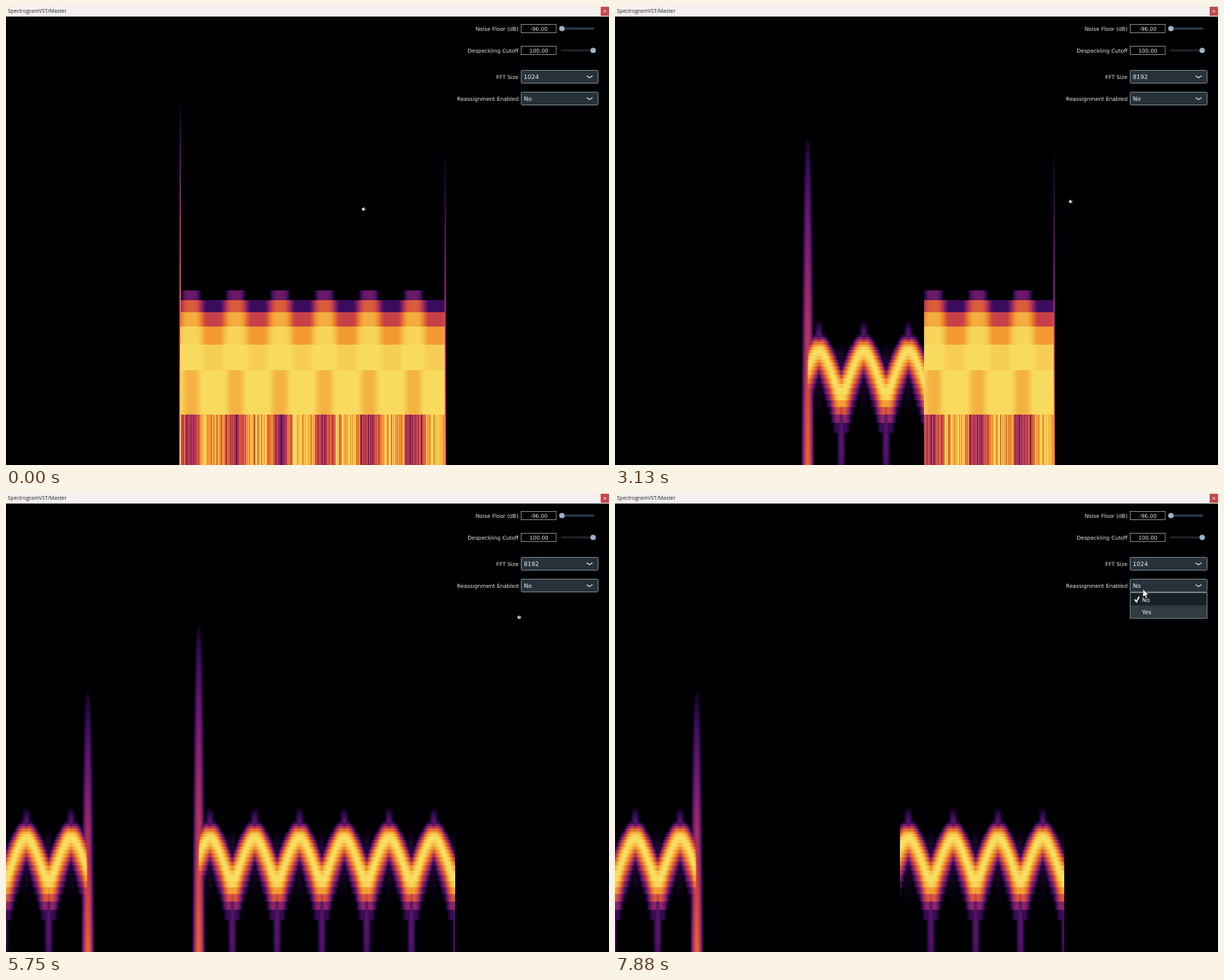
These frames come from a looping animation (800x610 px, 8000 ms). An HTML page with a canvas:

```html
<!DOCTYPE html>
<html lang="en">
<head>
<meta charset="utf-8">
<title>Spectrogram</title>
<style>
  html, body { margin: 0; width: 100%; height: 100%; overflow: hidden; background: #000; }
  canvas, svg { position: absolute; left: 0; top: 0; width: 800px; height: 610px; }
  text { font-family: "DejaVu Sans", sans-serif; font-size: 7.15px; fill: #e4e4e4; }
  .title { font-family: "Open Sans", sans-serif; font-size: 6.9px; fill: #222; }
  .label { text-anchor: end; }
  .number { text-anchor: middle; }
  .choice { font-size: 7.8px; fill: #f0f0f0; }
  .field { fill: #000; stroke: #8d8d8d; stroke-width: .9; }
  .combo { fill: #263238; stroke: #7f9096; stroke-width: .9; }
  .chevron { fill: none; stroke: #e4e8ea; stroke-width: 1.2; }
</style>
</head>
<body>
<canvas id="stage" width="800" height="610"></canvas>
<svg viewBox="0 0 800 610">
  <rect width="800" height="14" fill="#f5f1f0"/>
  <text class="title" x="2.5" y="9">SpectrogramVST/Master</text>
  <rect x="789" y="1" width="11" height="12" fill="#c44a4c"/>
  <path d="M793 5.5l3 3m0-3l-3 3" stroke="#fff" stroke-width=".9"/>
  <g id="controls"></g>
  <g id="menu">
    <rect x="683.5" y="132.5" width="102" height="34" fill="#303c40" stroke="#77868b" stroke-width=".9"/>
    <rect x="684" y="133" width="101" height="16.5" fill="#182126"/>
    <path d="M689.5 141.5l2.3 3.2 3.7-7" fill="none" stroke="#fff" stroke-width="1.6"/>
    <text class="choice" x="699" y="144.5">No</text>
    <text class="choice" x="699" y="161">Yes</text>
  </g>
  <g id="pointer" fill="#fff">
    <path id="arrow" d="M0 0V10L2.4 8 4 11.6 5.6 10.9 4 7.3H7Z" stroke="#222" stroke-width=".4"/>
    <path id="speaker" d="M-2.2-1.2H-1L.4-3V3L-1 1.2H-2.2ZM1-1.5h1v3H1Z"/>
  </g>
</svg>
<script>
const LOOP = 8000, STEP = 125;
const WRAP = 600, VISIBLE = 596, HEIGHT = 610;
const $ = id => document.getElementById(id);
const clamp = (v, a = 0, b = 1) => Math.max(a, Math.min(b, v));
const mix = (a, b, u) => a + (b - a) * u;
const smooth = (a, b, v) => { const u = clamp((v - a) / (b - a)); return u * u * (3 - 2 * u); };

// Evenly spaced colours from silent to loud.
const heat = ["#000003", "#3a0c5c", "#821f6a", "#c94147", "#f08a28", "#f9e464"]
  .map(hex => [1, 3, 5].map(i => parseInt(hex.slice(i, i + 2), 16)));

function colour(level) {
  const u = clamp(level) * (heat.length - 1), i = Math.min(Math.floor(u), heat.length - 2);
  return heat[i].map((v, c) => mix(v, heat[i + 1][c], u - i));
}

let seed = 7;
const random = () => (seed = (seed * 16807) % 2147483647) / 2147483647;

function paint(width, level) {
  const canvas = document.createElement("canvas");
  canvas.width = width;
  canvas.height = HEIGHT;
  const ctx = canvas.getContext("2d"), image = ctx.createImageData(width, HEIGHT);
  for (let y = 0, p = 0; y < HEIGHT; y++) {
    for (let x = 0; x < width; x++, p += 4) image.data.set([...colour(level(x, y)), 255], p);
  }
  ctx.putImageData(image, 0, 0);
  return canvas;
}

// Frequency bin of a row: the axis is logarithmic, bin 1 starts at y = base.
const binAt = (y, base) => Math.floor(Math.exp((base - y) / 84.3)) + .5;

// A click: a vertical spike that widens and brightens downwards.
function click(x, y, centre, top, loudness, width, fade) {
  const u = (y - top) / (HEIGHT - top);
  if (u <= 0) return 0;
  return loudness * u ** fade * (1 - ((x - centre) / (width * u ** .25)) ** 2);
}

// Short window: few broad bins, sharp clicks, unstable lowest bin.
const streaks = Array.from({ length: VISIBLE }, () => .12 - .3 * random() - .35 * random() ** 9);

function coarse(x, y) {
  const clicks = Math.max(
    click(x, y, 230.7, 125, 1.1, 1.6, .6), click(x, y, 582.1, 195, .8, 1.6, .6));
  if (x < 231 || x > 581) return clicks;
  const pitch = mix(1.4, 2.7, smooth(-.7, 1, Math.cos((x - 245) / 59 * 2 * Math.PI)));
  const bin = binAt(y, 542);
  const distance = bin > pitch ? bin - pitch : (pitch - bin) * 1.45;
  const level = .98 * (1 - (distance / 4.5) ** 2.5);
  return Math.max(clicks, bin < 1 ? level + streaks[x] : level);
}

// Long window: narrow bins follow a sine-modulated tone, clicks are blurred.
const START = 255.2, END = 708, PERIOD = 59.4;

function tone(x, y) {
  const bin = binAt(y, 717.3), angle = (x - START) / PERIOD * 2 * Math.PI;
  const s = Math.sin(angle), d = bin - 16.4 - 5.3 * s, inner = d * s < 0;
  const width = (5.2 + .8 * s + 3.6 * Math.abs(Math.cos(angle))) * (inner ? 1 + .35 * Math.abs(s) : 1);
  const ridge = .99 * Math.max(0, 1 - (d / width) ** 2) ** 1.3;
  const offset = Math.acos(Math.min(1, Math.abs(s))) / (2 * Math.PI) * PERIOD;
  const lobe = (inner ? .12 : .28) * (1 - (offset / 6) ** 2) * clamp(2 - Math.abs(d) / 7);
  return Math.max(ridge, lobe) * smooth(START - 5, START + 2, x) * smooth(END + 4, END - 3, x);
}

const fine = (x, y) => Math.max(
  tone(x, y), click(x, y, START, 176, .71, 9, .52), click(x, y, END, 262, .71, 9, .6));

const before = paint(VISIBLE, coarse);
const after = paint(1000, fine);

function addControls() {
  const number = (y, label, value, knob, track) => `
    <text class="label" x="680" y="${y + 2.6}">${label}</text>
    <rect class="field" x="683.5" y="${y - 5.5}" width="46.5" height="11"/>
    <text class="number" x="707" y="${y + 2.7}">${value}</text>
    <rect x="736" y="${y - 1.5}" width="44.5" height="3" rx="1.5" fill="${track}"/>
    <circle cx="${knob}" cy="${y}" r="3.6" fill="#9fb4c8"/>`;
  const combo = (y, label, id, value) => `
    <text class="label" x="680" y="${y + 2.6}">${label}</text>
    <rect class="combo" x="683.5" y="${y - 8.5}" width="102" height="17" rx="1"/>
    <text class="choice" id="${id}" x="687" y="${y + 2.8}">${value}</text>
    <path class="chevron" d="M770.3 ${y - 1.2}l3.9 2.6 3.9-2.6"/>`;
  $("controls").innerHTML =
    number(30, "Noise Floor (dB)", "-96.00", 737.5, "#2b3c48") +
    number(59, "Despeckling Cutoff", "100.00", 779, "#1d2225") +
    combo(94, "FFT Size", "size", "1024") +
    combo(123, "Reassignment Enabled", "enabled", "No");
}
addControls();

// Pointer stops as time, x, y.
const stops = [
  [0, 474.5, 270], [750, 735, 96], [1750, 606, 260.5], [5250, 602, 259],
  [6125, 740, 95], [7000, 707.5, 112], [7875, 700.5, 128]
];

function pointerAt(t) {
  const next = Math.max(1, stops.findIndex(stop => stop[0] >= t));
  const [t0, x0, y0] = stops[next - 1], [t1, x1, y1] = stops[next];
  const u = (t - t0) / (t1 - t0);
  return [mix(x0, x1, u), mix(y0, y1, u)];
}

const ctx = $("stage").getContext("2d");
const show = (id, on) => { $(id).style.display = on ? "" : "none"; };

function render(time) {
  const t = Math.floor(time / STEP) * STEP;
  const head = Math.round(35.8 + t / STEP * 14.95);

  // The write head sweeps right and wraps, replacing what was there.
  const copy = (from, width) =>
    width > 0 && ctx.drawImage(after, from, 0, width, HEIGHT, 0, 0, width, HEIGHT);
  ctx.fillStyle = "#000003";
  ctx.fillRect(0, 0, 800, HEIGHT);
  ctx.drawImage(before, 0, 0);
  copy(0, Math.min(head, VISIBLE));
  copy(WRAP, head - WRAP);

  $("size").textContent = t >= 1250 && t < 6375 ? "8192" : "1024";
  show("menu", t >= 7625);
  const [x, y] = pointerAt(t);
  const overControls = x > 595 && y < 155;
  $("pointer").setAttribute("transform", `translate(${x} ${y})`);
  show("arrow", overControls);
  show("speaker", !overControls);
}

const origin = performance.now();
function tick() {
  render((performance.now() - origin) % LOOP);
  requestAnimationFrame(tick);
}
render(0);
requestAnimationFrame(tick);
</script>
</body>
</html>
```
